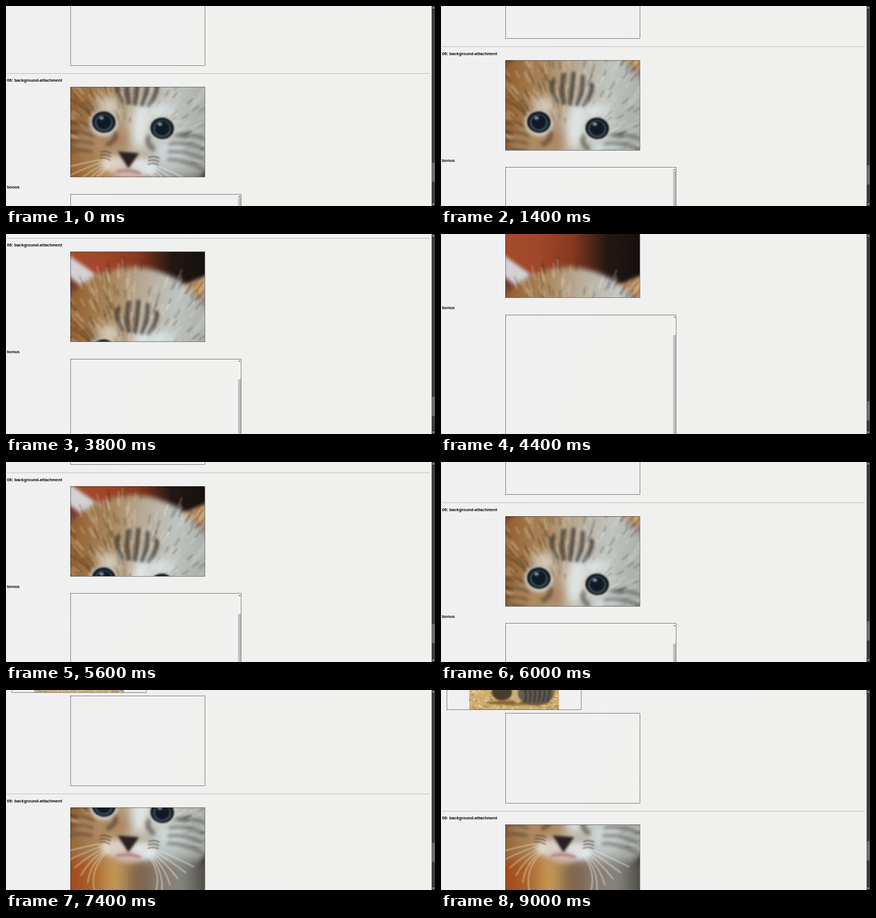
An HTML page with a canvas for the animation above (9.1 s loop, 760 px wide and 354 px high).

```html
<!DOCTYPE html>
<html lang="en">
<head>
<meta charset="utf-8">
<title>Background attachment</title>
<style>
html, body { margin: 0; width: 100%; height: 100%; overflow: hidden; background: #f0f0ee; }
canvas { display: block; }
</style>
</head>
<body>
<canvas id="stage" width="760" height="354"></canvas>
<script>
const W = 760, H = 354, LOOP = 9100, STEP = 100;
const ZOOM = 0.475; // the page is 1600 px wide, shown reduced
const ctx = document.getElementById('stage').getContext('2d');

// Each wheel tick moves the page by 100 px.
const TICK = 100, TICK_MS = 260;
const scrollDown = [1070, 1870, 3695, 4095];
const scrollUp = [4995, 5395, 5695, 5995, 6695, 7295];
const INNER_SCROLL = 2370;

function eased(t, start) {
  const u = Math.min(1, Math.max(0, (t - start) / TICK_MS));
  return u * u * (3 - 2 * u);
}

const total = (t, starts) => starts.reduce((sum, start) => sum + eased(t, start), 0);

function layer(w, h, paint) {
  const c = document.createElement('canvas');
  c.width = w;
  c.height = h;
  paint(c.getContext('2d'));
  return c;
}

function seeded(seed) {
  return () => (seed = (seed * 16807) % 2147483647) / 2147483647;
}

function ramp(g, x1, y1, x2, y2, colors) {
  const gradient = g.createLinearGradient(x1, y1, x2, y2);
  colors.forEach((color, i) => gradient.addColorStop(i / (colors.length - 1), color));
  return gradient;
}

function blob(g, color, x, y, rx, ry) {
  g.fillStyle = color;
  g.beginPath();
  g.ellipse(x, y, rx, ry, 0, 0, 7);
  g.fill();
}

function triangle(g, color, x1, y1, x2, y2, x3, y3) {
  g.fillStyle = color;
  g.beginPath();
  g.moveTo(x1, y1);
  g.lineTo(x2, y2);
  g.lineTo(x3, y3);
  g.fill();
}

function curve(g, color, width, x1, y1, cx, cy, x2, y2) {
  g.strokeStyle = color;
  g.lineWidth = width;
  g.beginPath();
  g.moveTo(x1, y1);
  g.quadraticCurveTo(cx, cy, x2, y2);
  g.stroke();
}

// The face is built around the point between the eyes; side is -1 or 1.
function ear(g, side) {
  g.filter = 'blur(3px)';
  triangle(g, side < 0 ? '#d3d1d4' : '#c59a6c', side * 45, -112, side * 140, -165, side * 140, -40);
  triangle(g, side < 0 ? '#7c4038' : '#96736b', side * 88, -98, side * 140, -132, side * 130, -50);
}

function fur(g) {
  const rnd = seeded(71);
  g.filter = 'blur(1.8px)';
  for (let i = 0; i < 420; i++) {
    const a = -Math.PI * rnd(), r = 60 + 150 * rnd(), reach = r + 8 + 16 * rnd();
    const tone = rnd() < 0.55 ? '240,236,226' : '52,38,28';
    const x = Math.cos(a), y = Math.sin(a);
    curve(g, `rgba(${tone},.26)`, 3, x * r, 55 + y * r, x * r, 55 + y * r, x * reach, 55 + y * reach);
  }
}

function forehead(g) {
  g.filter = 'blur(2.5px)';
  for (let i = -2; i <= 2; i++) {
    curve(g, 'rgba(38,34,32,.7)', 7, i * 17, -92 + i * i * 4, i * 20, -65, i * 12, -38);
  }
}

function cheek(g, side) {
  const dark = side < 0 ? 'rgba(66,44,26,.6)' : 'rgba(58,56,54,.6)';
  g.filter = 'blur(9px)';
  blob(g, side < 0 ? '#d8d2c4' : '#dbe6e8', side * 46, -30, 22, 14);
  blob(g, side < 0 ? '#b08a62' : '#cfd8d9', side * 72, 38, 28, 22);
  g.filter = 'blur(3px)';
  curve(g, dark, 8, side * 33, 14, side * 22, 26, side * 40, 38);
  for (let i = 0; i < 4; i++) {
    curve(g, dark, 5, side * 68, 12 + i * 14, side * 95, 2 + i * 16, side * 130, 10 + i * 18);
  }
}

function eye(g, side) {
  const x = side * 52;
  g.filter = 'blur(3px)';
  blob(g, '#cfd1ca', x, 2, 25, 23);
  g.filter = 'blur(1.5px)';
  blob(g, '#15181b', x, 0, 21, 19);
  blob(g, '#3d5364', x, 1, 16, 15);
  blob(g, '#101a24', x, 0, 13, 13);
  blob(g, '#8295a2', x - 5, -7, 4, 3);
}

function chest(g) {
  g.filter = 'blur(9px)';
  g.fillStyle = ramp(g, 114, 0, 353, 0,
    ['#a2481b', '#a9622c', '#c99d58', '#7a6048', '#8a7c70', '#85857f', '#4d4a45']);
  g.fillRect(90, 300, 290, 80);
}

function whiskers(g, side) {
  const color = side < 0 ? 'rgba(240,224,196,.7)' : 'rgba(226,240,246,.75)';
  g.filter = 'blur(1px)';
  for (let i = 0; i < 6; i++) {
    curve(g, color, 1.7, side * 34, 62 + i * 3, side * 66, 70 + i * 8, side * (118 - i * 13), 90 + i * 12);
  }
  for (let i = 0; i < 3; i++) {
    curve(g, 'rgba(56,46,40,.6)', 2, side * 34, 54 + i * 6, side * 43, 49 + i * 6, side * 52, 53 + i * 6);
  }
}

function muzzle(g) {
  g.filter = 'blur(5px)';
  for (const side of [-1, 1]) blob(g, side < 0 ? '#dccfc5' : '#dde2e1', side * 25, 72, 25, 15);
  blob(g, '#d2b2ac', 0, 85, 22, 10);
  g.filter = 'blur(2px)';
  triangle(g, '#2b2020', -22, 49, 16, 48, 0, 77);
  curve(g, '#8d6866', 2.5, -20, 85, 0, 78, 22, 83);
}

const portrait = layer(400, H, g => {
  const face = paint => {
    g.save();
    g.translate(225, 211);
    g.rotate(0.106);
    paint();
    g.restore();
  };
  const bothSides = part => [-1, 1].forEach(side => part(g, side));
  g.lineCap = 'round';
  g.fillStyle = ramp(g, 114, 0, 353, 0, ['#a64b2b', '#a0462a', '#87391f', '#231712', '#15110f']);
  g.fillRect(0, 0, 400, H);
  face(() => {
    bothSides(ear);
    g.filter = 'blur(5px)';
    blob(g, ramp(g, -115, 0, 125, 0, ['#93602f', '#a98458', '#b8aa96', '#bfc4c0', '#a9aeaa']), 0, 0, 152, 152);
    g.filter = 'blur(9px)';
    blob(g, '#dfe5e4', 14, -4, 18, 46);
    blob(g, '#ab7d55', -18, 30, 9, 20);
    fur(g);
    forehead(g);
    bothSides(cheek);
    bothSides(eye);
  });
  chest(g);
  face(() => {
    muzzle(g);
    bothSides(whiskers);
  });
});

// Square picture; only its lower end comes into view.
const thumbnail = layer(159, 159, g => {
  const rnd = seeded(19);
  g.fillStyle = '#cdae72';
  g.fillRect(0, 0, 159, 159);
  g.filter = 'blur(.7px)';
  for (let i = 0; i < 220; i++) {
    blob(g, rnd() < 0.5 ? '#e6d4a4' : '#a98448', rnd() * 159, 110 + rnd() * 49, 2.5, 1);
  }
  g.filter = 'blur(1.5px)';
  blob(g, '#8a6533', 85, 147, 55, 4);
  blob(g, '#4a3c2a', 58, 128, 18, 15);
  blob(g, '#c9ae80', 86, 130, 9, 18);
  blob(g, '#625c50', 118, 130, 32, 21);
  for (let i = 0; i < 6; i++) {
    curve(g, '#35322e', 2.5, 96 + i * 9, 118, 104 + i * 8, 132, 98 + i * 8, 146);
  }
});

function rect(color, x, y, w, h) {
  ctx.fillStyle = color;
  ctx.fillRect(x, y, w, h);
}

function frame(x, y, w, h) {
  ctx.strokeStyle = '#000';
  ctx.lineWidth = 1;
  ctx.strokeRect(x + 0.5, y + 0.5, w, h);
}

function arrow(color, x, y, size) {
  triangle(ctx, color, x - Math.abs(size), y + size / 2, x + Math.abs(size), y + size / 2, x, y - size / 2);
}

function label(text, y) {
  ctx.fillStyle = '#000';
  ctx.font = 'bold 15.7px "Liberation Sans", Arial, sans-serif';
  ctx.fillText(text, 3.8, y);
}

// The portrait stays fixed to the viewport; the box is a window on it.
function portraitBox(x, y, w, h) {
  ctx.save();
  ctx.beginPath();
  ctx.rect(x, y, w, h);
  ctx.clip();
  ctx.setTransform(1, 0, 0, 1, 0, 0);
  ctx.drawImage(portrait, 0, 0);
  ctx.restore();
  frame(x, y, w, h);
}

function page(top, inner) {
  const boxW = 501, boxH = 335, left = 240, bonus = top + 399;
  ctx.drawImage(thumbnail, 105, top - 764, boxH, boxH);
  frame(21, top - 764, boxW, boxH);
  frame(left, top - 416, boxW, boxH);
  rect('#808080', 4, top - 51, 1576, 1);
  label('06: background-attachment', top - 19.5);
  portraitBox(left, top, boxW, boxH);

  label('bonus', top + 378.5);
  rect('#f2f2f0', 866, bonus, 10, 800);
  rect('#bcbcbc', 866, bonus + 13 + 63 * inner, 10, 800);
  arrow('#444', 871, bonus + 8, 4);
  frame(left, bonus, 636, 800);
}

const paper = ramp(ctx, 0, 0, W, H, ['#f0f0f1', '#f0f1ec']);

function draw(t) {
  const scroll = TICK * (total(t, scrollUp) - total(t, scrollDown));
  rect(paper, 0, 0, W, H);
  ctx.save();
  ctx.scale(ZOOM, ZOOM);
  page(302 + scroll, eased(t, INNER_SCROLL));
  ctx.restore();

  rect('#3c3c3c', 754, 0, 6, H);
  rect('#707070', 754.5, 277 - scroll * 0.0475, 5, 34);
  arrow('#e8e8e8', 757, 3, 2);
  arrow('#e8e8e8', 757, H - 3, -2);
}

const begin = performance.now();
function tick() {
  const t = (performance.now() - begin) % LOOP;
  draw(Math.floor(t / STEP) * STEP);
  requestAnimationFrame(tick);
}
tick();
</script>
</body>
</html>
```
